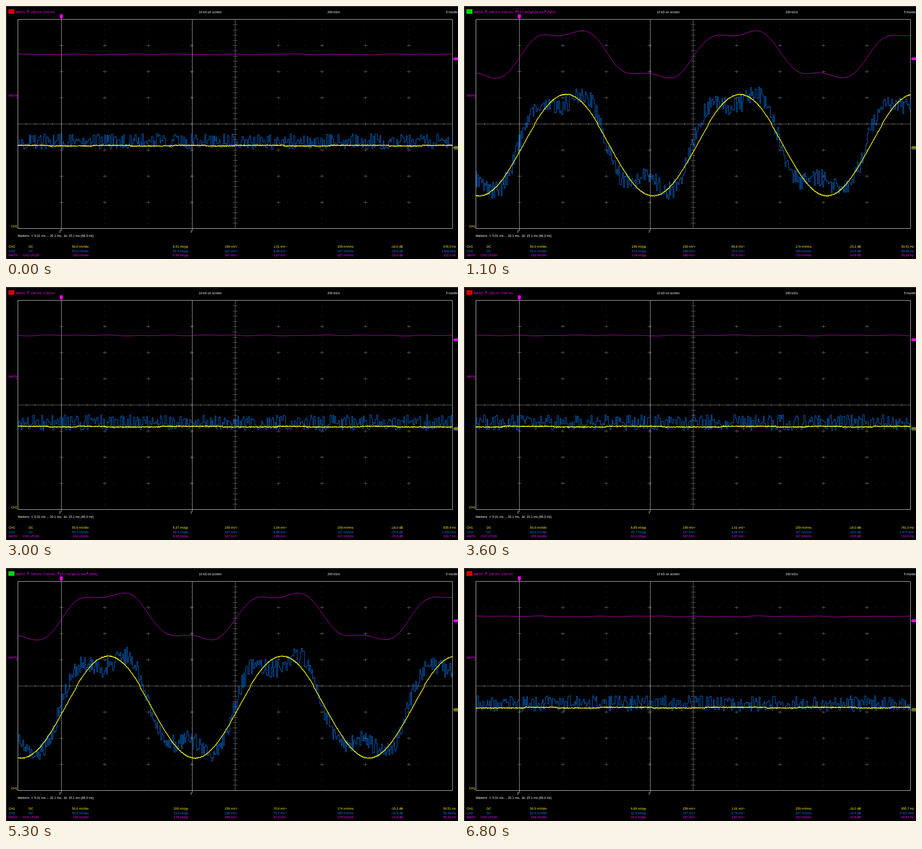
These frames come from a looping animation (999 px wide and 561 px high, 7000 ms). An HTML page with a canvas:

```html
<!DOCTYPE html>
<html lang="en">
<head>
<meta charset="utf-8">
<title>Oscilloscope</title>
<style>
html, body { margin: 0; width: 100%; height: 100%; overflow: hidden; background: #000; }
canvas { display: block; }
</style>
</head>
<body>
<canvas id="scope" width="999" height="561"></canvas>
<script>
const ctx = document.getElementById('scope').getContext('2d');
const LOOP = 7000, STEP = 100;
const L = 26, R = 987, T = 30, B = 493.3;
const DX = (R - L) / 10, DY = (B - T) / 8, MX = 506.5, MY = 261.7;
const YELLOW = '#ffff00', BLUE = '#0080ff', PINK = '#ff00ff', WHITE = '#ffffff';
const PERIOD = 384, { sin, cos, PI } = Math;

// Signal phases in steps; sweeps come every 1..maxHold steps.
const phases = [
  { from: 0, to: 3, live: false, maxHold: 2 },
  { from: 3, to: 20, live: true, maxHold: 2 },
  { from: 20, to: 23, live: false, maxHold: 1 },
  { from: 30, to: 44, live: false, maxHold: 2 },
  { from: 44, to: 64, live: true, maxHold: 3 },
  { from: 64, to: 70, live: false, maxHold: 2 }
];

const channels = [
  { name: 'CH1', mode: 'DC', modeX: 50, scale: '50.0', color: YELLOW,
    live: { pp: 200, mean: 159, ac: 69.8, hz: 50.51 }, idle: { pp: 6.4, mean: 159, ac: 1.02, hz: 700 } },
  { name: 'CH2', mode: 'DC', modeX: 50, scale: '50.0', color: BLUE,
    live: { pp: 211, mean: 166, ac: 70.1, hz: 50.4 }, idle: { pp: 33.2, mean: 166.6, ac: 8.83, hz: 1900 } },
  { name: 'MATH', mode: 'CH2 LP100', modeX: 37, scale: '100', color: PINK,
    live: { pp: 178, mean: 166, ac: 67, hz: 50.35 }, idle: { pp: 9.4, mean: 166.6, ac: 1.86, hz: 95 } }
];

function rng(seed) {
  let a = seed * 2654435761 + 12345 | 0;
  return () => {
    a = a + 0x6D2B79F5 | 0;
    let t = Math.imul(a ^ a >>> 15, 1 | a);
    t = t + Math.imul(t ^ t >>> 7, 61 | t) ^ t;
    return ((t ^ t >>> 14) >>> 0) / 4294967296;
  };
}

function schedule() {
  const r = rng(7), list = [];
  for (const p of phases)
    for (let at = p.from; at < p.to; at += 1 + Math.floor(r() * p.maxHold))
      list.push({ at, live: p.live });
  return list;
}

// Flattened wave in pixels above its middle; third scales the third harmonic.
function wave(x, third = 1) {
  const a = (x - 225.5) / PERIOD * 2 * PI;
  return 54.4 * cos(a) + 0.8 * sin(a) - third * (11.4 * cos(3 * a) - 4.3 * sin(3 * a));
}

function measure({ at, live }) {
  const r = rng(at + 500);
  const vary = (v, k) => v * (1 + (r() - 0.5) * k);
  const rows = channels.map((c, i) => {
    const m = live ? c.live : c.idle;
    return {
      pp: vary(m.pp, live ? 0.01 : 0.06 + 0.1 * (i !== 1)),
      mean: m.mean,
      ac: vary(m.ac, live ? 0.008 : 0.05),
      hz: live ? (i ? vary(m.hz, 0.004) : m.hz) : vary(m.hz, 0.8)
    };
  });
  return { rows, hi: 10.65 + r() * 0.12, lo: 9.27 + r() * 0.1, peak: 225.3 + r() * 1.6 };
}

function text(str, x, y, color, align = 'left') {
  ctx.fillStyle = color;
  ctx.textAlign = align;
  ctx.fillText(str, x, y);
}

function line(x1, y1, x2, y2) {
  ctx.moveTo(x1, y1);
  ctx.lineTo(x2, y2);
}

function stroke(color, width, build) {
  ctx.strokeStyle = color;
  ctx.lineWidth = width;
  ctx.beginPath();
  build();
  ctx.stroke();
}

function levelTag(color, y) {
  ctx.fillStyle = color;
  ctx.beginPath();
  line(988, y, 991, y - 3);
  ctx.lineTo(999, y - 3);
  ctx.lineTo(999, y + 3);
  ctx.lineTo(991, y + 3);
  ctx.fill();
}

function triggerTag(x, y) {
  ctx.fillStyle = PINK;
  ctx.beginPath();
  line(x - 3.2, y, x + 3.2, y);
  ctx.lineTo(x + 3.2, y + 7.5);
  ctx.lineTo(x, y + 10.5);
  ctx.lineTo(x - 3.2, y + 7.5);
  ctx.fill();
}

function arrow(x, dir) {
  const y = 13, tip = y - dir * 2.5;
  stroke(PINK, 1, () => {
    line(x, y + dir * 2.5, x + 5, tip);
    line(x + 2, tip, x + 5.4, tip);
    line(x + 5, tip, x + 5, tip + dir * 3);
  });
}

function grid() {
  const colX = i => Math.floor(L + i * DX) + 0.5, rowY = j => Math.floor(T + j * DY) + 0.5;
  ctx.fillStyle = '#505050';
  for (let i = 1; i < 10; i++)
    for (let k = 1; k < 40; k++)
      if (k % 5 && i !== 5) ctx.fillRect(colX(i) - 0.5, Math.round(T + k * DY / 5) - 0.5, 1, 1);
  for (let j = 1; j < 8; j++)
    for (let k = 1; k < 50; k++)
      if (k % 5 && j !== 4) ctx.fillRect(Math.round(L + k * DX / 5) - 0.5, rowY(j) - 0.5, 1, 1);

  stroke('#606060', 1, () => {
    for (let i = 1; i < 10; i++)
      for (let j = 1; j < 8; j++) {
        line(colX(i) - 4.5, rowY(j), colX(i) + 4.5, rowY(j));
        line(colX(i), rowY(j) - 3.5, colX(i), rowY(j) + 3.5);
      }
    for (let k = 1; k < 50; k++) line(colX(k / 5), MY - 2.5, colX(k / 5), MY + 2.5);
    for (let k = 1; k < 40; k++) line(MX - 5, rowY(k / 5), MX + 5, rowY(k / 5));
  });
  stroke('#707070', 1, () => {
    line(L, MY, R, MY);
    line(MX, T, MX, B);
  });
  stroke('#b0b0b0', 1, () => {
    line(122.4, T, 122.4, 499);
    line(411.9, T, 411.9, 499);
  });
  stroke('#d8d8d8', 1, () => ctx.rect(26.3, 29.8, 960.5, 463.6));
}

function backdrop() {
  ctx.fillStyle = '#000';
  ctx.fillRect(0, 0, 999, 561);
  ctx.fillStyle = '#2a2a2f';
  ctx.fillRect(0, 0, 999, 2);
  ctx.fillRect(0, 0, 2, 561);
  grid();
  triggerTag(122.2, 18.5);
  levelTag(PINK, 117);
  levelTag('#004480', 316.2);
  levelTag('#808000', 313.8);
  text('10 kS on screen', 426, 15.5, WHITE);
  text('200 kS/s', 710.5, 15.5, WHITE);
  text('5 ms/div', 998.3, 15.5, WHITE, 'right');
  text('MATH', 6, 201.3, PINK);
  stroke(PINK, 1, () => line(22, 203.5, 27, 203.5));
  text('CH1', 11.3, 491.3, YELLOW);
  text('2', 117.3, 501.7, WHITE);
  text('1', 407.2, 501.7, WHITE);
  text('Markers', 26, 512.3, WHITE);
  text('t: 5.01 ms ... 20.1 ms,  \u0394t: 15.1 ms (66.3 Hz)', 56.5, 512.3, WHITE);
}

function header(live, { hi, lo }) {
  ctx.fillStyle = live ? '#00ff00' : '#ff0000';
  ctx.fillRect(5.5, 7.5, 13, 9.5);
  text(live ? 'TR.' : 'TR:', 6.5, 15, live ? '#064006' : '#500000');
  text('MATH', 22, 16, PINK);
  arrow(45, 1);
  text('150 mV', 55, 16, PINK);
  text('5.00 ms', 83, 16, PINK);
  if (!live) return;
  arrow(112.5, 1);
  text(hi.toPrecision(3) + ' ms', 118.5, 16, PINK);
  arrow(144, -1);
  text(lo.toPrecision(3) + ' ms', 150, 16, PINK);
  arrow(175.5, 1);
  text('(' + Math.round(100 * hi / (hi + lo)) + '%)', 183.7, 16, PINK);
}

function table(rows) {
  channels.forEach((c, i) => {
    const { pp, mean, ac, hz } = rows[i];
    const y = 536.3 + i * 9.2, rms = Math.hypot(mean, ac);
    const put = (s, x) => text(s, x, y, c.color, 'right');
    text(c.name, 6, y, c.color);
    text(c.mode, c.modeX, y, c.color);
    put(c.scale + ' mV/div', 182.7);
    put(pp.toPrecision(3) + ' mVpp', 402.5);
    put(mean.toPrecision(3) + ' mV=', 511.5);
    put(ac < 1 ? Math.round(ac * 1000) + ' \u00b5V~' : ac.toPrecision(3) + ' mV~', 621.3);
    put(rms.toPrecision(3) + ' mVrms', 768);
    put((20 * Math.log10(rms / 1000)).toFixed(1) + ' dB', 877.5);
    put(hz >= 1000 ? (hz / 1000).toPrecision(4) + ' kHz' : hz.toPrecision(4) + ' Hz', 994.3);
  });
}

function traceMath(live, r) {
  const a = r() * 6, b = r() * 6, c = r() * 6;
  stroke('#f000f0', 0.85, () => {
    for (let x = L; x <= R; x += 2) {
      const ripple = 0.5 * sin(x / 11 + a) + 0.5 * sin(x / 19 + b) + 0.4 * sin(x / 47 + c);
      ctx.lineTo(x, 107.3 + ripple - (live ? wave(x) : 0));
    }
  });
}

function traceCh2(live, r) {
  stroke(BLUE, 0.9, () => {
    let side = 1;
    for (let x = L; x < R;) {
      const w = Math.min(R - x, live ? 1.7 + r() * 1.1 : 1.6 + r() * 2);
      if (r() < 0.62) side = -side;
      const y = live ? 302 - 2 * wave(x + 5, 1.2) + side * 20 * r() : 300.5 + side * 17.5 * r();
      ctx.lineTo(x, y);
      ctx.lineTo(x + w, y + (r() - 0.5) * 1.5);
      x += w;
    }
  });
}

function traceCh1(live, r, { peak, rows }) {
  const amp = 112 * rows[0].pp / 201;
  let low = r() < 0.5, next = L + 40 + r() * 90;
  stroke(YELLOW, 1.5, () => {
    for (let x = L; x <= R; x += 0.7) {
      if (x > next) {
        low = !low;
        next = x + 60 + r() * 80;
      }
      let y = low ? 310.4 : 308.9;
      if (live) {
        y = 310 - amp * cos((x - peak) / PERIOD * 2 * PI);
        if (y < 264) y -= 3;
      }
      ctx.lineTo(x, y + (r() - 0.5) * 2);
    }
  });
}

function draw(sweep) {
  const data = measure(sweep), r = rng(sweep.at + 1);
  ctx.font = '7px "Liberation Sans", Arial, sans-serif';
  ctx.lineJoin = 'round';
  backdrop();
  traceMath(sweep.live, r);
  traceCh2(sweep.live, r);
  traceCh1(sweep.live, r, data);
  header(sweep.live, data);
  table(data.rows);
}

const sweeps = schedule(), start = performance.now();
let shown = null;
function tick() {
  const t = Math.max(0, performance.now() - start) % LOOP / STEP;
  const sweep = sweeps.filter(s => s.at <= t).pop();
  if (sweep !== shown) draw(shown = sweep);
  requestAnimationFrame(tick);
}
tick();
</script>
</body>
</html>
```
